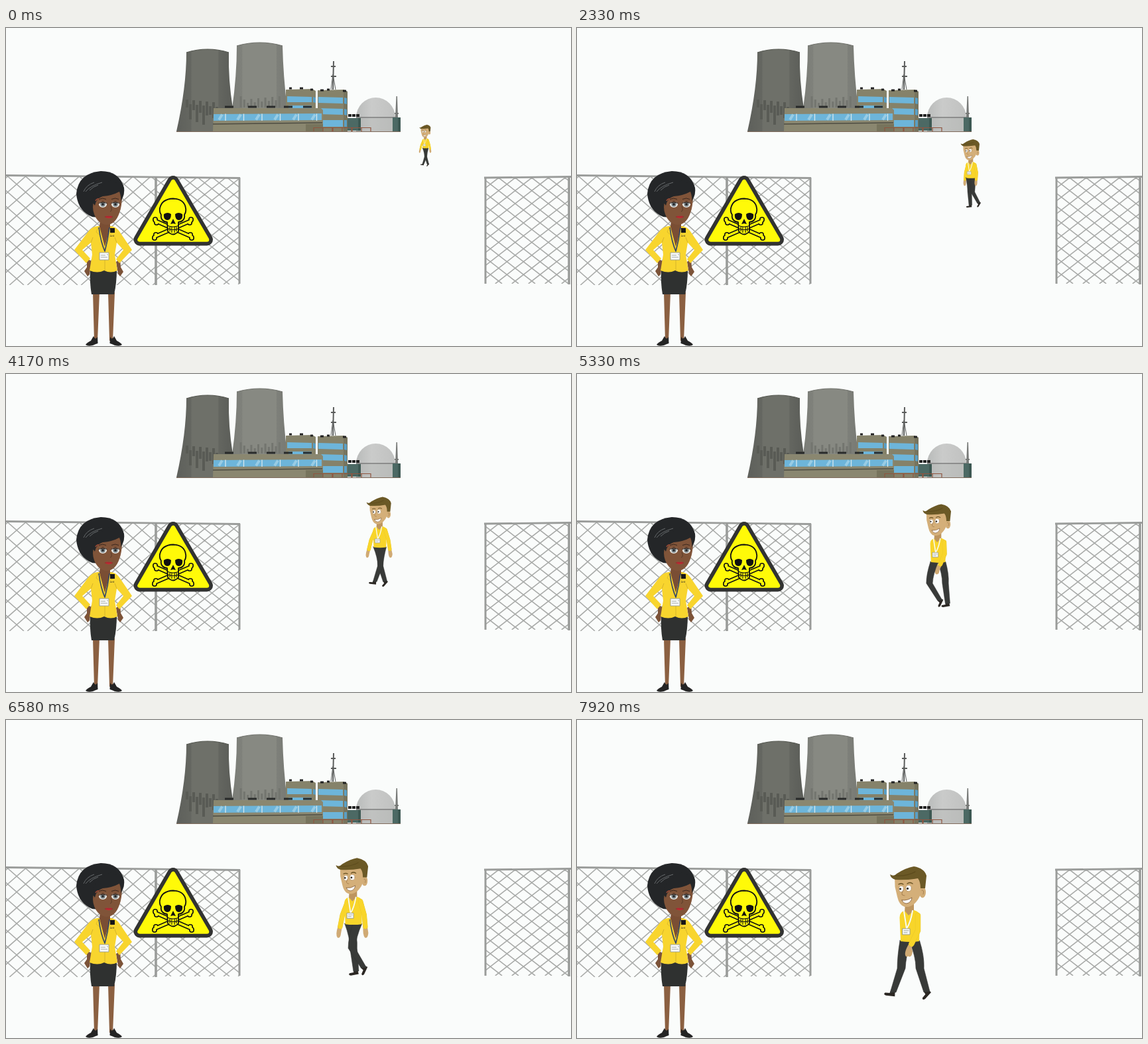
Animation, 852 px wide and 480 px high, one loop 8000 ms. Source, as an HTML page:

```html
<!DOCTYPE html>
<html lang="en">
<head>
<meta charset="utf-8">
<title>Plant gate</title>
<style>
html, body { margin: 0; width: 100%; height: 100%; overflow: hidden; background: #fafcfb; }
body > svg { display: block; width: 100vw; height: 100vh; }
text { font-family: "Liberation Sans", sans-serif; }
</style>
</head>
<body>
<svg viewBox="0 0 852 480">
  <defs>
    <linearGradient id="dark">
      <stop offset="0" stop-color="#5e605b"/><stop offset=".26" stop-color="#656761"/>
      <stop offset=".27" stop-color="#6e7069"/><stop offset=".74" stop-color="#6e7069"/>
      <stop offset=".75" stop-color="#646660"/><stop offset="1" stop-color="#5b5d58"/>
    </linearGradient>
    <linearGradient id="light">
      <stop offset="0" stop-color="#7b7d77"/><stop offset=".18" stop-color="#7f817b"/>
      <stop offset=".19" stop-color="#878982"/><stop offset=".8" stop-color="#878982"/>
      <stop offset=".81" stop-color="#7e807a"/><stop offset="1" stop-color="#787a74"/>
    </linearGradient>
    <linearGradient id="dome">
      <stop offset="0" stop-color="#b9bbba"/><stop offset=".4" stop-color="#cacbca"/>
      <stop offset="1" stop-color="#c0c1c0"/>
    </linearGradient>
  </defs>

  <g id="plant">
    <path fill="url(#light)" d="M348 27Q383 17 417 27Q418 72 424 121H341Q348 72 348 27Z"/>
    <path fill="none" stroke="#70726c" stroke-width="1.200" d="M348 27Q383 17 417 27"/>
    <path id="drips2" stroke="#73756f" stroke-width="3"/>
    <path fill="url(#dark)" d="M272 37Q304 27 336 37Q335 78 342 121V156H257Q272 90 272 37Z"/>
    <path fill="none" stroke="#555750" stroke-width="1.200" d="M272 37Q304 27 336 37"/>
    <path id="drips1" stroke="#595b55" stroke-width="4"/>

    <path fill="#85826a" d="M422 93L462 92L467 95V123H422Z"/>
    <path fill="#6db5da" d="M424 103L461 104V112H424ZM426 117H461V121H426Z"/>
    <path fill="#5a9fc5" d="M463 104L467 105V113L463 112Z"/>
    <path fill="#85826a" d="M470 94L509 93L515 96V156H470Z"/>
    <path fill="#77745e" d="M509 93L515 96V156H509Z"/>
    <path fill="#6db5da" d="M471 104L508 105V114L471 113ZM471 121L508 122V131L471 130ZM471 139H508V149H477Z"/>
    <path fill="#5a9fc5" d="M510 105L514 106V115L510 114ZM510 122L514 123V132L510 131ZM510 139H514V149H510Z"/>
    <path stroke="#222" stroke-width="3" d="M427 91h4M443 91h5M459 93h4M474 94h5M484 93h4M508 95h5"/>
    <g fill="none" stroke="#5b5d5c">
      <path stroke-width="2" d="M493 93L494 50M490 58h7M490 73h8"/>
      <path d="M490 93L493 70L497 93"/>
    </g>

    <path fill="url(#dome)" d="M528 135A29.500 30 0 0 1 587 135V156H528Z"/>
    <path fill="#a9abaa" opacity=".3" d="M528 136H587V156H528Z"/>
    <path stroke="#555" d="M528 135H587"/>
    <path fill="#4c6964" d="M515 136H535V155H515ZM583 135H595V156H583Z"/>
    <path fill="#3c5852" d="M531 136H535V155H531ZM591 135H595V156H591Z"/>
    <path stroke="#222" stroke-width="4" d="M516 132h5M522 132h5M528 132h5"/>
    <path fill="#777977" d="M587 135L588.500 103H590L591 135ZM586 128h6v2h-6Z"/>

    <path fill="#8a8770" d="M313 121H475L478 124V157H312Z"/>
    <path fill="#77745d" d="M452 145H478V157H452Z"/>
    <path fill="#6db5da" d="M313 130L476 129V139L313 140Z"/>
    <path id="glints" stroke="#98cce5" stroke-width="4"/>
    <path id="panes" stroke="#d8e8ee" stroke-width="1.300"/>
    <path stroke="#4d4c42" stroke-width="1.500" d="M312 145L477 143"/>
    <path stroke="#292b2a" stroke-width="3" d="M330 119h13M365 119h13M393 119h13M419 119h13M448 119h13"/>
    <path id="rail" fill="none" stroke="#8f5540" stroke-width="1.200"/>
    <path stroke="#806b5c" d="M257 156.500H595"/>
  </g>

  <g id="fence" stroke="#a9aba9" fill="none"></g>
  <g fill="none" stroke="#9a9c9a">
    <path stroke-width="2.800" d="M0 222.500L353 226.500M721 226L852 224.500"/>
    <path stroke-width="3.600" d="M226 224V388M849 225V387"/>
    <path stroke-width="3" d="M352 226V386M723 226V386"/>
  </g>

  <g id="sign" stroke-linejoin="round">
    <path fill="#323332" stroke="#323332" stroke-width="18" d="M252 232L201.500 319.500H303Z"/>
    <path fill="#fffa08" stroke="#fffa08" stroke-width="6.500" d="M252 232L201.500 319.500H303Z"/>
    <g id="bones" stroke-linecap="round"></g>
    <g stroke="#111" stroke-width="1.800" fill="#fffa08">
      <path d="M236 290Q233 287 234 282Q231 278 232 272Q235 258 252 257.500Q269 258 271 272Q272 278 269 282Q270 287 267 290Q264 293 260 293L260 307Q252 316 244 307L243 293Q239 293 236 290Z"/>
      <path stroke-width="1.100" fill="none" d="M243 298Q252 302 261 298M244 303Q252 306 260 303M247 299v8M250 300v9M254 300v9M257 299v8"/>
    </g>
    <path fill="#111" d="M238 281Q244 277 249 281Q249 290 243 290Q237 289 238 281ZM266 281Q260 277 255 281Q255 290 261 290Q267 289 266 281ZM252 288L256 296L252 295L248 296Z"/>
  </g>

  <g id="guard" stroke-linejoin="round">
    <path fill="#8b6041" d="M131 399H141L138 472H133ZM154 399H164L161 472H156Z"/>
    <path fill="#242424" d="M132 465Q135 472 138 466L138.500 476Q135 477 131 479Q123 481 120 478Q122 475 128 472ZM163 465Q160 472 157 466L156.500 476Q160 477 164 479Q172 481 175 478Q173 475 167 472Z"/>
    <path fill="#7c5338" d="M122 348L129 352L126 372L123 375L118 367L122 361ZM172 348L166 353L169 371L172 375L177 368L173 361Z"/>
    <path fill="#2f3130" d="M127 364H167Q167 385 163 402H129Q126 385 127 364Z"/>
    <path fill="#f8d52e" d="M138 299Q130 300 125 306L103 335L121 355L127 348L115 335L128 324L130 342L126 366Q138 371 148 366Q158 371 168 366L164 342L167 324L177 335L166 349L171 355L190 335L171 307Q166 300 159 299Z"/>
    <path fill="none" stroke="#d6b42a" d="M128 324L131 316M167 324L164 316M149 350V366"/>
    <path fill="#7a4e34" d="M142 288H157V301L149 330L141 300Z"/>
    <path fill="none" stroke="#d6b42a" stroke-width=".8" d="M140 299L136 308L141 312L149 334L157 312L162 308L158 299"/>
    <path fill="none" stroke="#2f4468" stroke-width="1.600" d="M140 301Q143 324 149 337Q153 322 156 301"/>
    <path fill="#f8faf8" stroke="#8c9291" stroke-width=".8" d="M141 339H155V350H141Z"/>
    <path stroke="#a3a8a8" d="M143 343h7M143 346h10M152 342h2"/>
    <path fill="#171717" d="M157 302h7v7h-7z"/>
    <text x="157" y="315" font-size="4" fill="#222">unit</text>

    <path fill="#242628" d="M143 216Q171 216 178 241Q179 250 176 256L150 280Q139 287 130 285Q108 276 106 250Q109 219 143 216Z"/>
    <path fill="#805439" d="M133 261Q139 256 143 254Q160 250 170 240L175 252Q175 269 171 279Q165 297 151 297Q138 295 133 281Q129 270 133 261Z"/>
    <path fill="#242628" d="M131 264Q130 240 160 230L176 240Q178 254 173 262Q174 254 171 247Q160 253 146 254Q136 257 134 268Z"/>
    <path fill="none" stroke="#666a6c" d="M117 247Q121 237 133 233M120 247Q127 238 145 233M126 245Q132 239 139 237"/>
    <path fill="none" stroke="#9a4b36" stroke-width="1.500" d="M135 261Q137 257 141 258"/>
    <g id="eyes"></g>
    <path fill="none" stroke="#573a28" d="M158 269Q161 276 157 277"/>
    <path fill="#c62c34" d="M149 285Q152 282.500 155 284Q158 282.500 161 285Q155 289.500 149 285Z"/>
    <path stroke="#82202a" stroke-width=".7" d="M149 285H161"/>
  </g>

  <g id="man" stroke-linejoin="round" stroke-linecap="round">
    <g id="farArm"></g>
    <g id="farLeg"></g>
    <g id="nearLeg"></g>
    <path fill="#bd955f" d="M-5 54H8V72L0 76L-6 70Z"/>
    <path fill="#f8d52a" d="M-6 67Q-14 69 -13.500 78L-12 113Q2 115 16 113L17 76Q18 69 8 66L0 74Z"/>
    <ellipse cx="21" cy="39" rx="5" ry="8.500" fill="#d2ad77"/>
    <path fill="none" stroke="#a78150" d="M20 36Q24 35 22 42"/>
    <path fill="#d4af79" d="M-21 16L-20.500 31L-17 46Q-14 59 -6 61Q2 62 8 57Q15 51 18 42L20 16Z"/>
    <path fill="#6b5926" d="M-28 12Q-22 16 -18 11Q-4 2 8 0Q24 3 27 14L25 33L18 33Q18 23 14 18Q-2 21 -20 20Q-27 18 -28 12Z"/>
    <path fill="none" stroke="#5c4b1d" stroke-width="1.200" d="M-20 14Q-2 15 10 8"/>
    <path fill="none" stroke="#665022" stroke-width="1.400" d="M-15 27Q-11 25 -8 27M-2 26Q2 23 6 26"/>
    <g fill="#fff" stroke="#a27f4e" stroke-width=".6">
      <ellipse cx="-11" cy="34" rx="3.600" ry="4.500"/><ellipse cx="0" cy="33" rx="4.300" ry="4.800"/>
    </g>
    <circle cx="-12.500" cy="34" r="1.500" fill="#30291f"/><circle cx="-1.500" cy="33.500" r="1.600" fill="#30291f"/>
    <path fill="none" stroke="#a98150" stroke-width="1.100" d="M-8 36Q-13 44 -6 44"/>
    <path fill="#fff" stroke="#7d5936" stroke-width=".8" d="M-10 51Q-2 52 5 47Q4 55 -3 56Q-8 56 -10 51Z"/>
    <path fill="none" stroke="#f8faf3" stroke-width="2" d="M-7 68Q-5 81 -3 94Q3 85 6 67"/>
    <path fill="#f8faf8" stroke="#8e9492" stroke-width=".9" d="M-9 94H2V103H-9Z"/>
    <path stroke="#9ca29f" d="M-7 97h7M-7 100h5"/>
    <g id="nearArm"></g>
  </g>
</svg>
<script>
const $ = id => document.getElementById(id);
const path = (id, d) => $(id).setAttribute('d', d);
const range = (n, fn) => Array.from({ length: n }, (_, i) => fn(i)).join('');

// Building details
path('drips1', range(10, i => `M${273 + i * 5} ${108 + (i * 7) % 13}v${12 + (i * 11) % 19}`));
path('drips2', range(12, i => `M${354 + i * 5.3} ${103 + (i * 5) % 11}V120`));
path('panes', range(6, i => `M${331 + i * 27.5} 129.5v10.5`));
path('glints', range(6, i => `M${326 + i * 28} 130.500l-5 8`));
path('rail', range(3, i => `M${464 + i * 29} 157v-6.500h28v6.500m-14 0v-6.500`));

// Chain-link panels: x, y, width, height, spacing, slope
function mesh(x, y, w, h, gap, slope) {
  const run = h / slope;
  const d = range(Math.ceil((w + 2 * run) / gap), i => {
    const px = (i * gap - run).toFixed(1);
    return `M${px} 0l${run} ${h}M${px} 0l${-run} ${h}`;
  });
  return `<svg x="${x}" y="${y}" width="${w}" height="${h}"><path stroke-width="1.6" d="${d}"/></svg>`;
}
$('fence').innerHTML = mesh(0, 224, 226, 164, 27, .88)
  + mesh(227, 225, 125, 162, 22, .8) + mesh(723, 226, 127, 160, 25, .78);

// Crossed bones
const bone = (x1, y1, x2, y2) => {
  const dots = [[x1, y1 - 2], [x1 + 2, y1 + 3], [x2, y2 + 2], [x2 - 2, y2 - 3]];
  const layer = (c, w, r) => `<path stroke="${c}" stroke-width="${w}" d="M${x1} ${y1}L${x2} ${y2}"/>`
    + dots.map(([x, y]) => `<circle cx="${x}" cy="${y}" r="${r}" fill="${c}"/>`).join('');
  return layer('#111', 6.6, 4) + layer('#fffa08', 3.4, 2.4);
};
$('bones').innerHTML = bone(225, 291, 280, 315)
  + `<g transform="translate(504 0) scale(-1 1)">${bone(225, 291, 280, 315)}</g>`;

$('eyes').innerHTML = [146, 165].map(x =>
  `<ellipse cx="${x}" cy="266" rx="6" ry="5" fill="#e9ebe7"/>
   <circle cx="${x}" cy="266" r="3.7" fill="#7b858a"/><circle cx="${x}" cy="266" r="1.8" fill="#222"/>
   <path fill="#6e4731" d="M${x - 6} 264q6 -7 12 0q-6 -2 -12 0z"/>
   <path fill="none" stroke="#2a201b" d="M${x - 6.500} 264.500q6.500 -3 13 0"/>
   <path fill="none" stroke="#3a281f" d="M${x - 6} 258.500q6 -3 11 0"/>`).join('');

// Walk cycle of one leg: knee x, ankle x, ankle y, foot angle
const STRIDE = [
  [3, -10, 190, 12], [6, -3, 192, 3], [9, 6, 194, 0], [12, 14, 193, 0], [16, 20, 193, -4],
  [17, 27, 189, -42], [15, 27, 188, -42], [11, 25, 187, -36], [7, 24, 186, -52], [-1, 19, 187, -58]
];
const STEPS = STRIDE.length, FRAMES = 96, LOOP = 8000;

function leg(id, phase, dx) {
  const [kx, ax, ay, turn] = STRIDE[phase % STEPS];
  $(id).innerHTML = `<g transform="translate(${dx} 0)">
    <path fill="#2b2723" transform="translate(${ax} ${ay}) rotate(${turn})" d="M-3 -3H3L4.500 5.500L-9 7Q-14 6 -11 3L-4 2Z"/>
    <path fill="#383a38" stroke="#303230" stroke-width=".6" d="M1 112H16.500Q${kx + 7} 136 ${kx + 6} 154L${ax + 5} ${ay}L${ax - 4} ${ay + 1}L${kx - 6} 154Q${kx - 6} 136 1 112Z"/></g>`;
}

function arm(id, hx, ex, sx) {
  const wx = ex + (hx - ex) * .6;
  const sleeve = `M${sx} 74L${ex} 97L${wx} 117`;
  $(id).innerHTML = `
    <path fill="#d0aa74" d="M${wx - 3.500} 116L${wx + 3.500} 117L${hx + 4} 128Q${hx + 3} 138 ${hx - 2} 136Q${hx - 6} 131 ${wx - 3.500} 116Z"/>
    <path fill="none" stroke="#e6c428" stroke-width="8.400" d="${sleeve}"/>
    <path fill="none" stroke="#f8d52a" stroke-width="7.600" d="${sleeve}"/>`;
}

let last = -1;
function draw(ms) {
  const n = Math.floor((ms % LOOP) * FRAMES / LOOP + .05) % FRAMES;
  if (n === last) return;
  last = n;
  const s = n / 12, phase = n % STEPS;
  const swing = Math.cos(phase / STEPS * 2 * Math.PI);
  $('man').setAttribute('transform',
    `translate(${632 - 16.67 * s} ${146 + 9.47 * s}) scale(${(64 + 17.8 * s) / 205})`);
  leg('nearLeg', phase, 0);
  leg('farLeg', phase + STEPS / 2, -14);
  arm('nearArm', 12 + 14 * swing, 17.5 + 3.5 * swing, 14);
  arm('farArm', -12 - 14 * swing, -12 - 6 * swing, -8);
}

const start = performance.now();
function tick() {
  draw(performance.now() - start);
  requestAnimationFrame(tick);
}
tick();
</script>
</body>
</html>
```
